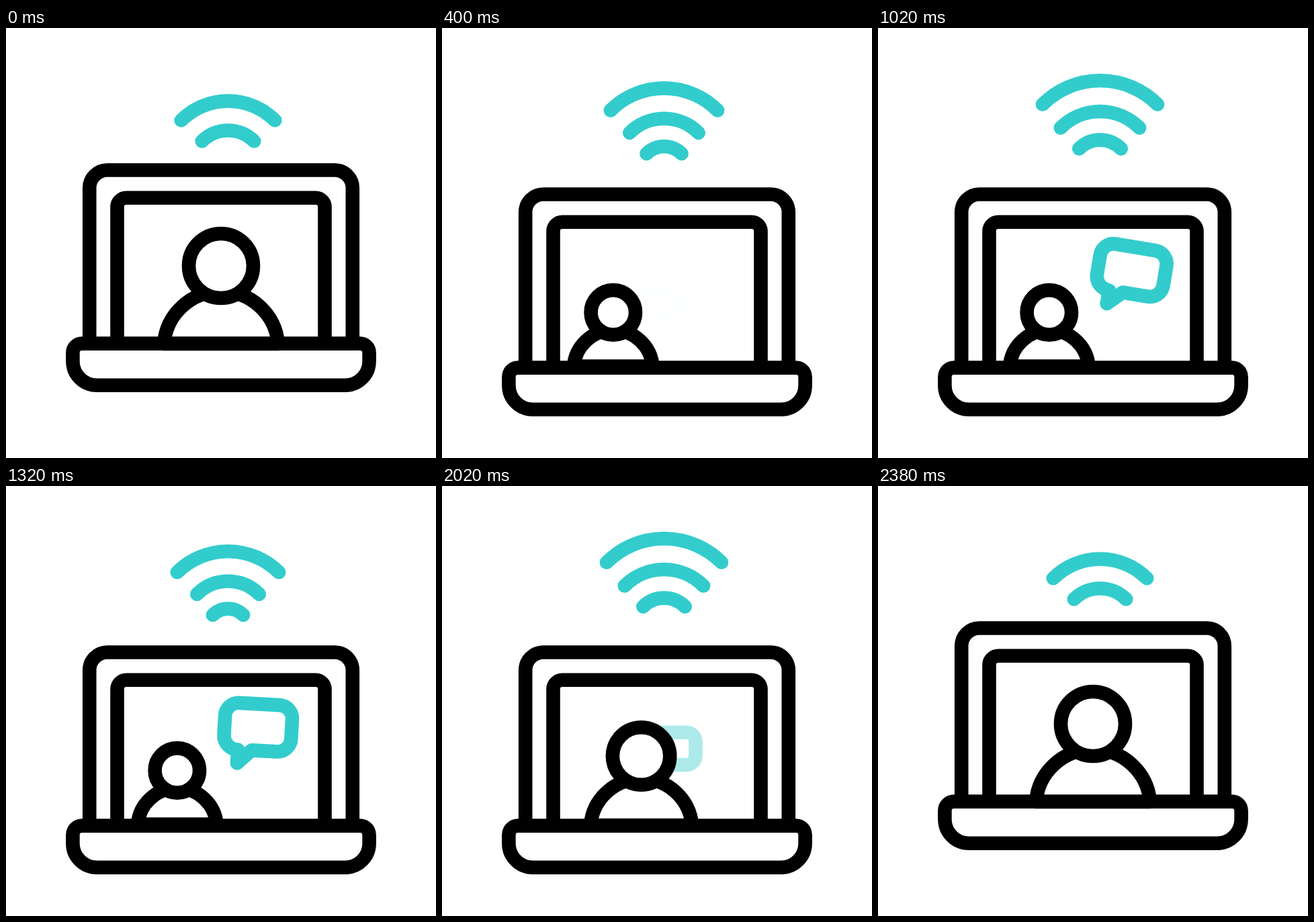
Recreate the animation shown at these times as an HTML page. Size 640 by 640 pixels, loop 2.4 s.

```html
<!DOCTYPE html>
<html lang="en">
<head>
<meta charset="utf-8">
<title>Online meeting</title>
<style>
  html, body { margin: 0; width: 100%; height: 100%; overflow: hidden; background: #fff; }
  svg { display: block; width: 100vw; height: 100vh; }
  svg * { vector-effect: non-scaling-stroke; }
  .ink, .teal { fill: none; stroke: #000; stroke-width: 20.6; stroke-linejoin: round; }
  .teal { stroke: #3cc; stroke-linecap: round; }
  #person { fill: #fff; }
</style>
</head>
<body>
<svg viewBox="0 0 640 640">
  <g class="teal"><path class="wave"/><path class="wave"/><path class="wave"/></g>
  <g id="laptop" class="ink">
    <path id="lid"/>
    <path id="screen"/>
    <path id="bubble" class="teal"/>
    <g id="person">
      <path d="M-85-7A85.3 85.3 0 0 1 85-7Z"/>
      <circle cy="-123" r="48"/>
    </g>
    <path id="base"/>
  </g>
</svg>
<script>
const LOOP = 2400, STEP = 200;
const $ = id => document.getElementById(id);
const waves = document.querySelectorAll('.wave');

const mix = (a, b, k) => a + (b - a) * k;
const linear = k => k;
const smooth = k => k * k * (3 - 2 * k);

// Rises from 0 to 1 within one step.
const ramp = (t, from, ease = smooth, span = STEP) =>
  ease(Math.min(1, Math.max(0, (t - from) / span)));
const visit = (t, come, go, ease, span) => ramp(t, come, ease, span) - ramp(t, go, ease, span);

const corner = (r, dx, dy) => `a${r} ${r} 0 0 1 ${dx * r} ${dy * r}`;

// An arch with rounded shoulders, centred on the stage.
const arch = (half, top, r, foot) =>
  `M${320 - half} ${foot}V${top + r}${corner(r, 1, -1)}H${320 + half - r}${corner(r, 1, 1)}V${foot}`;

function build() {
  const d = (id, path) => $(id).setAttribute('d', path);
  d('lid', arch(195.8, 211.5, 26.7, 470));
  d('screen', arch(154.5, 252.7, 13.6, 470));
  d('base', arch(220.6, 469.6, 13.6, 496) +
    corner(35.7, -1, 1) + 'H135.1' + corner(35.7, -1, -1) + 'Z');
  d('bubble', 'M-28.2 35C-40 35-50 26-50 14.5V-14.7' + corner(20, 1, -1) + 'H30' +
    corner(20, 1, 1) + 'V14.7' + corner(20, -1, 1) + 'H-8L-28.4 55Z');
}

// Half widths a wave grows through on its way up.
const WIDTHS = [17.6, 38.8, 69.8, 94.3];

function drawWaves(t) {
  const turns = (t - STEP) / 500;
  const live = turns > 0 && turns <= 4;
  const phase = live ? turns - Math.ceil(turns) + 1 : 0;
  waves.forEach((wave, i) => {
    const w = mix(WIDTHS[i], WIDTHS[i + 1], phase);
    const y = 199.5 - 31 * (i + phase) - (i === 2 ? 6 * phase : 0);
    const r = w * Math.SQRT2;
    wave.setAttribute('d', `M${330.5 - w} ${y}A${r} ${r} 0 0 1 ${330.5 + w} ${y}`);
  });
  waves[0].style.display = live ? '' : 'none';
}

// Half a swing, four full ones to and fro, back to level.
function swing(t) {
  let angle = 0;
  for (let i = 0; i < 5; i++) {
    angle += (i % 4 ? 20 : 10) * (i % 2 ? 1 : -1) * ramp(t, 600 + STEP * i);
  }
  return angle;
}

function place(id, x, y, scale = 1, rest = '') {
  $(id).setAttribute('transform', `translate(${x} ${y}) scale(${scale}) ${rest}`);
}

function draw(t) {
  drawWaves(t);
  place('laptop', 0, 36 * visit(t, 20, 2200, smooth, 180));

  const side = visit(t, 200, 1902);
  place('person', mix(320, 254.8, side), mix(477, 472.5, side), mix(1, 0.692, side));

  const pop = visit(t, 400, 1900);
  place('bubble', mix(326, 374, pop), mix(372, 322.5, pop), mix(0.54, 1, pop),
    `rotate(${swing(t)} -11 23)`);
  $('bubble').style.opacity = visit(t, 400, 1900, linear);
}

build();
const start = performance.now();
function tick() {
  draw((performance.now() - start) % LOOP);
  requestAnimationFrame(tick);
}
tick();
</script>
</body>
</html>
```
